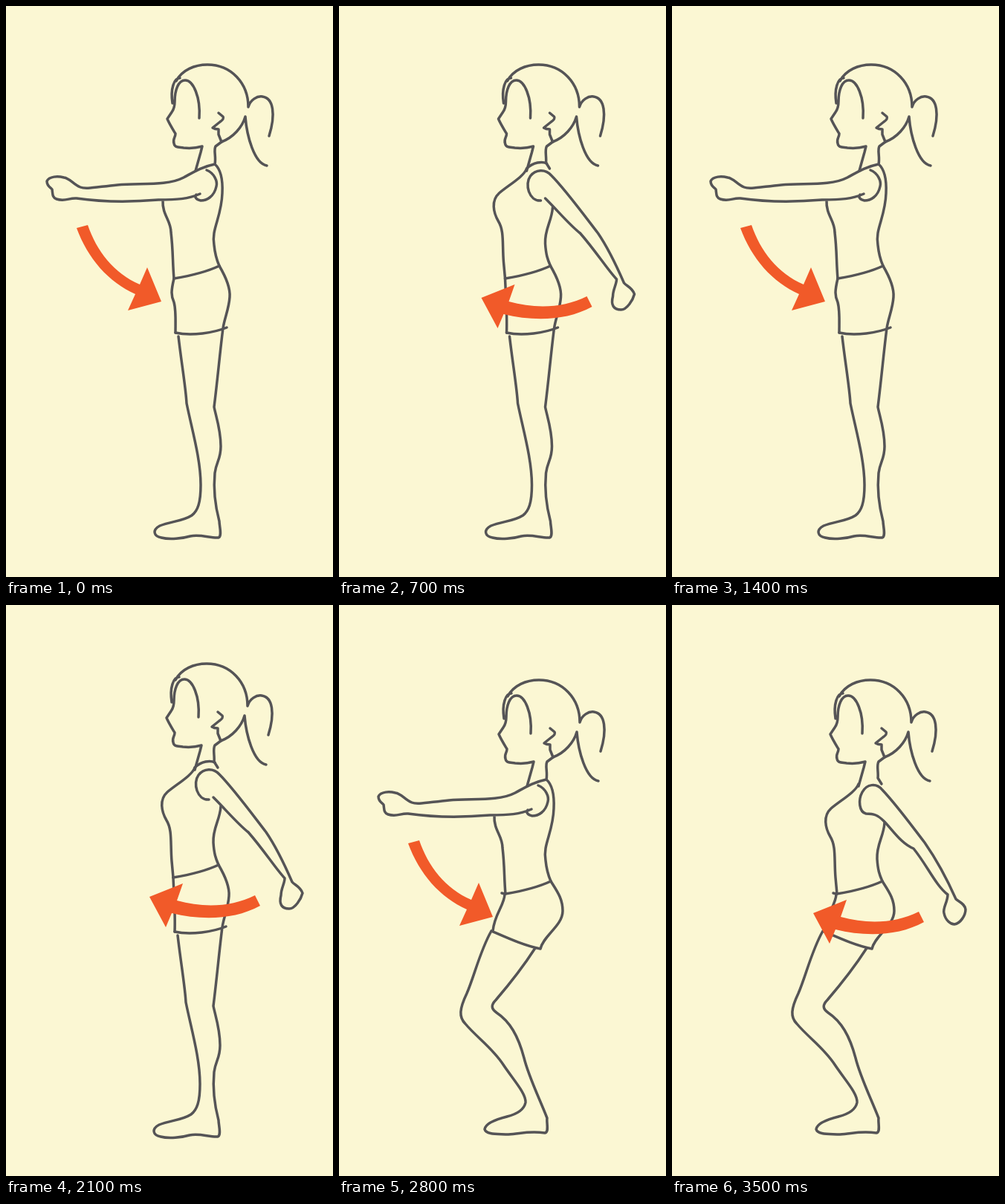
An HTML page with a canvas that plays this animation: 440x769 px, repeating every 4200 ms.

```html
<!DOCTYPE html>
<html lang="en">
<head>
<meta charset="utf-8">
<title>Arm swing exercise</title>
<style>
  html, body { margin: 0; width: 100%; height: 100%; overflow: hidden; background: #fbf7d3; }
  canvas { display: block; width: 440px; height: 769px; }
</style>
</head>
<body>
<canvas id="stage"></canvas>
<script>
const INK = '#555456', ORANGE = '#f15a29', PAPER = '#fbf7d3';
const STEP = 700;
const path = (...parts) => new Path2D(parts.join(' '));

const head = path(
  'M224 131C221 112 226 97 234 97',
  'M229 101C237 86 254 79 271 79C303 79 326 104 326 136',
  'M260 151C262 123 252 100 241 100C232 100 227 113 227 129C227 135 226 139 223 143L217 152C220 159 225 167 228 172C228 177 224 179 226 185C227 191 232 190 239 191C248 192 257 191 264 189L262 197L255 222',
  'M286 144L292 149Q294 152 288 156L278 164Q281 166 286 166L286 173L290 183C306 177 318 163 322 149',
  'M326 136C329 126 338 121 345 122C360 124 363 146 354 175',
  'M322 149C324 175 334 212 351 215');

const waist = path('M226 367C250 363 270 358 287 350');

const standing = path(
  'M287 350C297 367 302 380 301 392C300 408 294 420 292 434C288 465 285 500 280 540C282 551 289 570 289 593C289 611 283 613 281 629C279 650 282 675 287 694C287 700 291 714 286 716C275 717 262 711 248 714C238 717 220 719 209 716C199 714 196 706 207 700C222 694 238 694 250 686C258 680 262 669 262 645C262 610 250 570 243 535C242 515 236 480 232 445',
  'M228 440C250 445 280 440 297 433');
const shortsReach = path('M226 367C222 384 222 390 226 399C229 410 228 425 228 440');
const shortsSwing = path('M226 367C227 392 229 415 228 440');

const squatting = path(
  'M221 366L225 367C225 382 211 394 209 417',
  'M207 417C230 427 252 437 273 441C277 423 303 410 303 390C303 373 295 363 287 350',
  'M207 417C192 443 184 478 174 501C164 522 163 533 172 542C187 560 209 575 223 597C237 618 254 636 253 648C251 658 240 664 228 667C212 671 199 677 198 684C200 692 217 690 230 691C247 690 257 686 279 689C285 688 281 676 282 669C272 643 257 613 251 588C243 558 232 539 214 527C207 522 206 517 213 510C231 489 248 468 266 440');

const reach = path(
  'M290 183L282 189C279 194 283 203 281 213C289 220 292 232 291 252C290 285 276 300 280 322C281 332 283 341 287 350',
  'M211 261C210 282 222 288 222 305C225 330 224 345 226 367',
  'M281 213C262 217 252 224 239 231C216 243 180 238 150 241C120 244 107 247 100 244C90 240 86 232 78 231C70 229 58 229 55 236C55 243 61 245 62 247C63 253 62 258 68 260C80 264 85 258 95 259C130 264 170 264 205 261C230 261 245 260 261 253',
  'M270 221C280 225 285 236 283 243C280 257 270 262 262 262C256 261 253 257 256 254');

const swingTorso = path(
  'M290 183L282 189C279 194 282 203 281 211L286 219',
  'M255 219C251 230 231 241 218 252C207 262 210 278 217 290C225 303 222 320 224 345L226 367',
  'M290 271C289 290 279 300 280 320C281 335 283 341 287 350');
const collar = path('M255 219C264 210 276 209 282 212');

const straightArm = path(
  'M274 262C258 263 252 240 260 229C267 220 280 219 288 228C306 246 328 276 351 306C366 328 376 350 386 373C389 377 397 379 400 388C398 396 390 409 382 409C372 409 368 403 371 391C371 382 376 375 376 368C363 354 348 330 327 306C313 295 299 278 280 259');
const bentArm = path(
  'M265 259C256 257 254 241 260 230C266 219 279 217 287 227C306 247 324 272 344 298C360 321 374 347 386 374C390 378 398 380 399 388C399 396 392 407 384 408C379 408 372 403 370 393C368 386 375 378 375 368C359 356 347 328 329 306C312 299 301 281 289 269C281 261 276 259 265 259');

const arrowDown = path('M95 299L110 295C122 330 145 360 180 375L190 352L209 398L164 410L174 388C138 372 110 340 95 299Z');
const arrowBack = path('M336 391L343 405C308 424 265 425 224 415L216 434L194 393L239 375L231 398C267 408 304 407 336 391Z');

const poses = [
  { x: 0 },
  { x: -2.5, swing: true },
  { x: -3 },
  { x: -1, swing: true },
  { x: -2, squat: true },
  { x: -4, swing: true, squat: true }
];

const canvas = document.getElementById('stage');
const ctx = canvas.getContext('2d');
const ratio = window.devicePixelRatio || 1;
canvas.width = 440 * ratio;
canvas.height = 769 * ratio;

function figure({ swing, squat }) {
  const legs = squat ? [squatting] : [standing, swing ? shortsSwing : shortsReach];
  if (!swing) return [head, waist, ...legs, reach];
  const arm = squat ? [bentArm] : [straightArm, collar];
  return [head, waist, ...legs, swingTorso, ...arm];
}

function draw(pose) {
  ctx.setTransform(ratio, 0, 0, ratio, 0, 0);
  ctx.fillStyle = PAPER;
  ctx.fillRect(0, 0, 440, 769);
  ctx.translate(pose.x, pose.squat ? 22 : 0);
  ctx.strokeStyle = INK;
  ctx.lineWidth = 3.5;
  ctx.lineCap = ctx.lineJoin = 'round';
  figure(pose).forEach(part => ctx.stroke(part));
  ctx.fillStyle = ORANGE;
  ctx.fill(pose.swing ? arrowBack : arrowDown);
}

const start = performance.now();
function tick() {
  const elapsed = performance.now() - start;
  draw(poses[Math.floor(elapsed / STEP) % poses.length]);
  requestAnimationFrame(tick);
}
tick();
</script>
</body>
</html>
```
